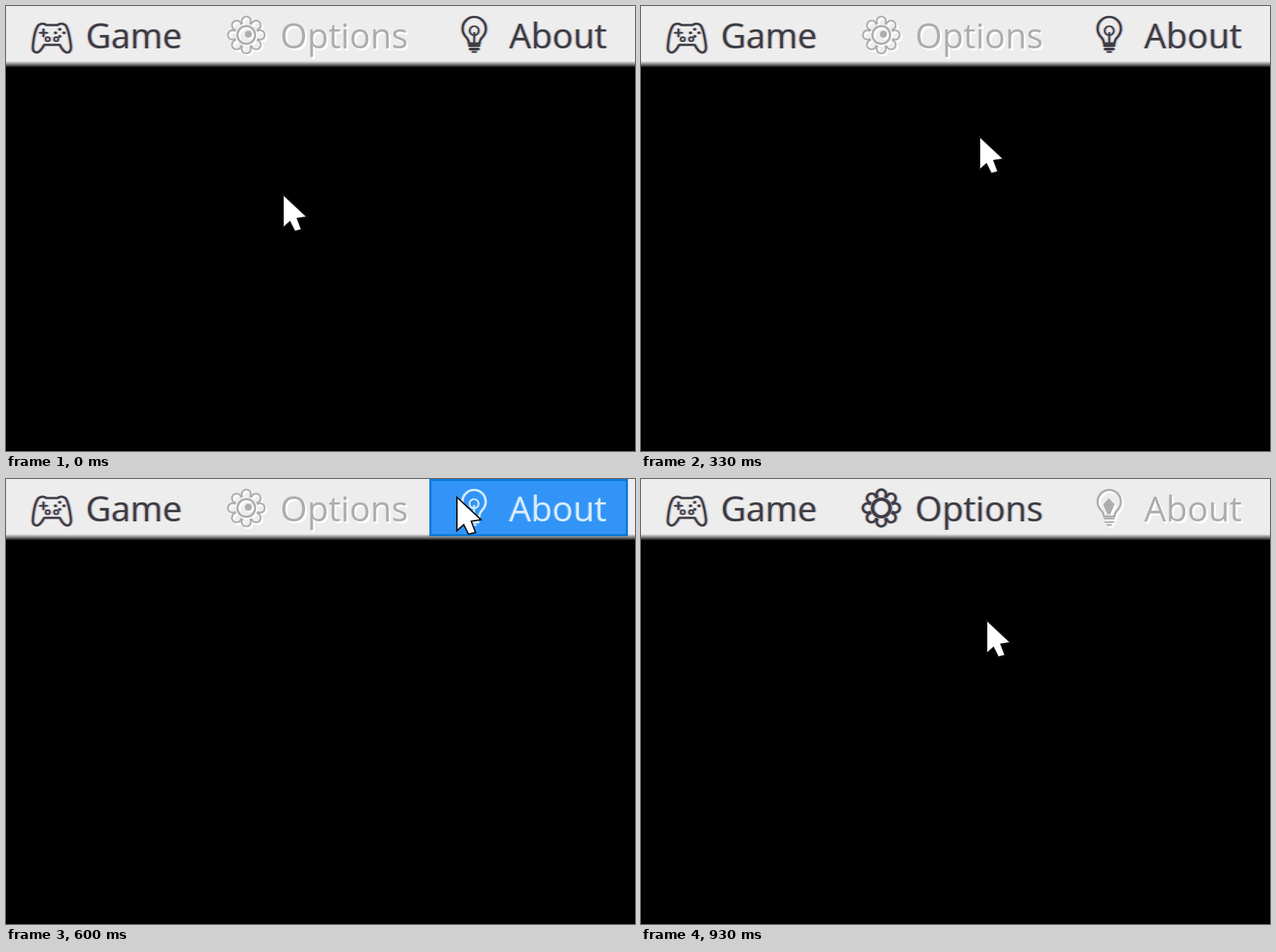
Write an HTML page with a canvas that moves like this. It is 890 px wide and 630 px high and loops after 1 s.

```html
<!DOCTYPE html>
<html lang="en">
<head>
<meta charset="utf-8">
<title>Toolbar hover</title>
<style>
  html, body { margin: 0; width: 100%; height: 100%; overflow: hidden; background: #000; }
  canvas { display: block; }
</style>
</head>
<body>
<canvas id="stage" width="890" height="630"></canvas>
<script>
const ctx = document.getElementById('stage').getContext('2d');
const TAU = Math.PI * 2;

// Each style is a list of passes: colour and offset, drawn bottom to top.
const STYLES = {
  normal: [['rgba(226,150,96,.55)', -1.8, 0], ['rgba(90,150,226,.55)', 1.8, 0], ['#3e3c43', 0, 0]],
  disabled: [['#fff', 2.8, 2.8], ['#adadad', 0, 0]],
  hot: [['rgba(130,205,255,.5)', -1.5, 0], ['#d9ebfc', 0, 0]]
};

const GAMEPAD = new Path2D(
  'M46 27 Q52 23 57 27 L73 27 Q78 23 84 27 Q89 33 92 58 Q92 66 86 66 ' +
  'Q81 65 76 55 L54 55 Q48 66 43 66 Q37 65 38 57 Q40 34 46 27 Z');
const BULB = new Path2D(
  'M655 53 Q655 48 650 43 Q646 38 646 32 A16.5 16.5 0 0 1 679 32 Q679 38 675 43 Q670 48 670 53 Z');
const ARROW = new Path2D('M0 0 V43 L9 35 L16 49 L24 47 L18 31 L31 29 Z');

function ring(x, y, r, width) {
  ctx.lineWidth = width;
  ctx.beginPath();
  ctx.arc(x, y, r, 0, TAU);
  ctx.stroke();
}

function dot(x, y, r) {
  ctx.beginPath();
  ctx.arc(x, y, r, 0, TAU);
  ctx.fill();
}

function line(x1, y1, x2, y2, width) {
  ctx.lineWidth = width;
  ctx.beginPath();
  ctx.moveTo(x1, y1);
  ctx.lineTo(x2, y2);
  ctx.stroke();
}

function gamepad() {
  ctx.lineWidth = 3;
  ctx.stroke(GAMEPAD);
  line(48, 38, 58, 38, 2.6);
  line(53, 33, 53, 43, 2.6);
  for (const [x, y] of [[76, 33], [82, 38], [76, 43], [70, 38]]) dot(x, y, 2.1);
  ring(59, 47, 3, 2);
  ring(71, 47, 3, 2);
}

function gear(state) {
  const off = state === 'disabled';
  for (let i = 0; i < 8; i++) {
    const a = i * TAU / 8;
    ctx.lineWidth = off ? 2.4 : 3.2;
    ctx.beginPath();
    ctx.arc(340 + 19.5 * Math.cos(a), 41 + 19.5 * Math.sin(a), 6.6, a - 2.1, a + 2.1);
    ctx.stroke();
  }
  ring(340, 41, 12.5, off ? 3 : 4.5);
  if (off) dot(343, 40, 5);
}

function bulb(state) {
  ctx.lineWidth = 3;
  ctx.stroke(BULB);
  if (state === 'disabled') {
    ctx.fill(new Path2D('M662 27 L670 36 L664 50 L660 50 L654 36 Z'));
  } else {
    ring(662.5, 35, 6.5, 2.2);
    line(662.5, 38, 662.5, 51, 2.4);
  }
  const w = state === 'disabled' ? 2.4 : 4;
  line(656, 56, 669, 56, w);
  line(657, 61, 668, 61, w);
  line(660, 65, 665, 65, 2.5);
}

function item(text, x, icon, state) {
  for (const [color, dx, dy] of STYLES[state]) {
    ctx.save();
    ctx.translate(dx, dy);
    ctx.fillStyle = ctx.strokeStyle = color;
    ctx.fillText(text, x, 60);
    icon(state);
    ctx.restore();
  }
}

function toolbar(hot, swapped) {
  ctx.fillStyle = '#ededed';
  ctx.fillRect(0, 0, 890, 80);
  const edge = ctx.createLinearGradient(0, 78, 0, 87);
  edge.addColorStop(0, '#ededed');
  edge.addColorStop(0.35, '#a0a0a0');
  edge.addColorStop(0.65, '#5c5c5c');
  edge.addColorStop(1, '#000');
  ctx.fillStyle = edge;
  ctx.fillRect(0, 78, 890, 9);
  if (hot) {
    ctx.fillStyle = '#0c79d8';
    ctx.fillRect(599, 0, 281, 81);
    ctx.fillStyle = '#3294f6';
    ctx.fillRect(602, 3, 275, 75);
  }
  ctx.filter = 'blur(.7px)';
  ctx.font = '49px "Open Sans", "Noto Sans", sans-serif';
  ctx.lineCap = ctx.lineJoin = 'round';
  item('Game', 113, gamepad, 'normal');
  item('Options', 388, gear, swapped ? 'normal' : 'disabled');
  item('About', 712, bulb, hot ? 'hot' : swapped ? 'disabled' : 'normal');
}

function cursor(x, y) {
  ctx.save();
  ctx.translate(x, y);
  ctx.lineJoin = 'miter';
  ctx.filter = 'blur(.5px)';
  ctx.strokeStyle = '#111';
  ctx.lineWidth = 4;
  ctx.stroke(ARROW);
  ctx.fillStyle = '#fff';
  ctx.fill(ARROW);
  ctx.restore();
}

// Pointer keys: [step, x, y]; the screen updates 15 times a second.
const KEYS = [[0, 393, 269], [3, 393, 269], [4, 425, 239], [5, 480, 187], [6, 550, 120],
  [7, 607, 66], [8, 637, 34], [9, 639, 28], [13, 639, 28], [14, 490, 202]];

function pointer(step) {
  const i = Math.max(1, KEYS.findIndex(k => k[0] >= step));
  const [s0, x0, y0] = KEYS[i - 1], [s1, x1, y1] = KEYS[i];
  const u = (step - s0) / (s1 - s0);
  return [x0 + (x1 - x0) * u, y0 + (y1 - y0) * u];
}

function draw(now) {
  const t = now % 1000;
  let step = 14;
  while (Math.round(step * 20 / 3) * 10 > t) step--;
  ctx.filter = 'none';
  ctx.fillStyle = '#000';
  ctx.fillRect(0, 0, 890, 630);
  toolbar(step >= 8 && step < 14, step === 14);
  cursor(...pointer(step));
}

let start;
function tick(now) {
  start ??= now;
  draw(now - start);
  requestAnimationFrame(tick);
}
requestAnimationFrame(tick);
</script>
</body>
</html>
```
